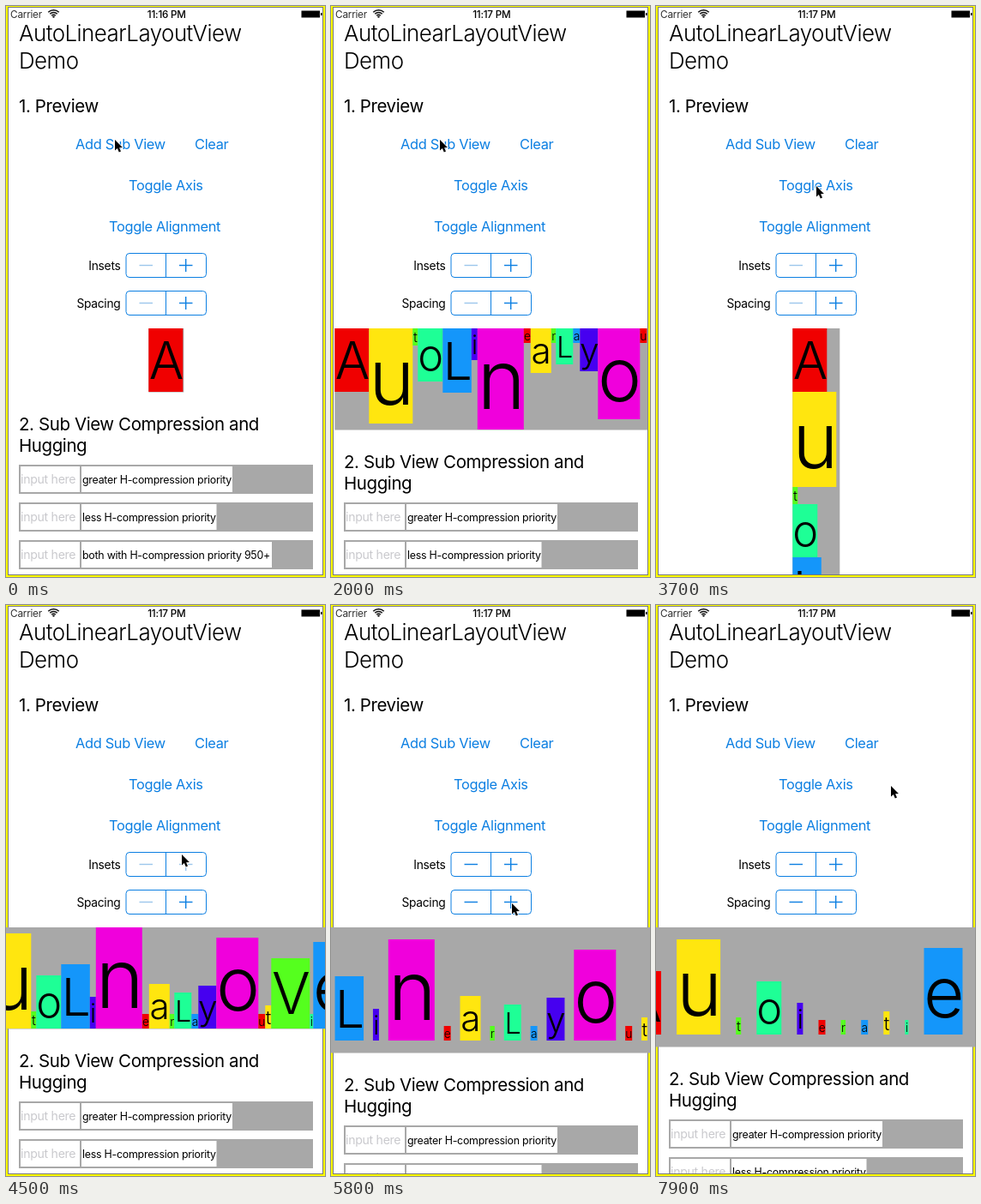
Recreate the animation shown at these times as an HTML page with a canvas. Size 372 px wide and 666 px high, loop 8000 ms.

```html
<!DOCTYPE html>
<html lang="en">
<head>
<meta charset="utf-8">
<title>AutoLinearLayoutView Demo</title>
<style>
html, body { margin: 0; width: 100%; height: 100%; overflow: hidden; background: #fff; }
canvas { display: block; width: 372px; height: 666px; }
</style>
</head>
<body>
<canvas id="stage"></canvas>
<script>
const W = 372, H = 666, LOOP = 8000;
const BLUE = '#0c7fe2', DIM = '#9cc6ec', GRAY = '#a8a8a8';
const TOP = 376, MID = 186.3;
const INSET_STEP = 3.5, GAP_STEP = 3.62;

const canvas = document.getElementById('stage');
const ctx = canvas.getContext('2d');
const ratio = window.devicePixelRatio || 1;
canvas.width = W * ratio;
canvas.height = H * ratio;
ctx.scale(ratio, ratio);

// Sub views: one letter each, with label width and height
const COLORS = ['#f00000', '#ffe60f', '#55ff1e', '#1eff96', '#1496fa', '#4600f0', '#f000dc'];
const WIDTHS = [40, 51, 6, 29, 33.5, 7, 54, 8, 24, 5.5, 20, 8, 21, 49, 8, 7, 45, 4, 45, 31];
const HEIGHTS = [74, 111, 20, 62, 75, 37, 118, 17, 52, 17, 42, 17, 50, 106, 17, 27, 82, 17, 101, 50];
const ITEMS = [...'AutoLinearLayoutView'].map((char, i) => ({
  char, w: WIDTHS[i], h: HEIGHTS[i], color: COLORS[i % COLORS.length]
}));

// Click times
const AXIS = [3400, 3850];
const ALIGN = [4100, 4220];
const INSETS = [4550, 4700, 4850, 5000];
const SPACING = [5350, 5500, 5650, 5920, 6050];
const REMOVE = [6, 10, 12, 8, 13, 14, 16, 4].map((item, i) => ({ item, at: 6300 + i * 160 }));

const passed = (clicks, t) => clicks.filter(c => t >= c).length;
const pressed = (clicks, t) => clicks.some(c => t >= c - 80 && t < c);

function stateAt(t) {
  const gone = REMOVE.filter(r => t >= r.at).map(r => r.item);
  const count = Math.min(ITEMS.length, 1 + Math.floor((t + 100) / 145));
  return {
    items: ITEMS.slice(0, count).filter((_, i) => !gone.includes(i)),
    vertical: passed(AXIS, t) === 1,
    align: passed(ALIGN, t) / 2,
    inset: passed(INSETS, t) * INSET_STEP,
    gap: passed(SPACING, t) * GAP_STEP
  };
}

function layout({ items, vertical, align, inset, gap }) {
  const main = vertical ? 'h' : 'w', cross = vertical ? 'w' : 'h';
  const long = items.reduce((sum, it) => sum + it[main], 0) + gap * (items.length - 1);
  const thick = Math.max(...items.map(it => it[cross]));
  const w = (vertical ? thick : long) + 2 * inset;
  const h = (vertical ? long : thick) + 2 * inset;
  const x = MID - w / 2;
  let pos = inset;
  const boxes = items.map(it => {
    const off = inset + (thick - it[cross]) * align;
    const box = { it, x: x + (vertical ? off : pos), y: TOP + (vertical ? pos : off) };
    pos += it[main] + gap;
    return box;
  });
  return { x, w, h, boxes };
}

// Cursor path: [time, x, y]
const PATH = [
  [0, 127, 156], [2950, 127, 156], [3250, 187, 210], [3900, 187, 210],
  [4050, 187, 258], [4250, 187, 258], [4430, 205, 291], [5080, 205, 291],
  [5280, 211, 348], [6090, 211, 348]
];
for (const { item, at } of REMOVE) {
  const { it, x, y } = layout(stateAt(at - 1)).boxes.find(b => b.it === ITEMS[item]);
  const tipX = Math.max(6, Math.min(W - 8, x + it.w / 2));
  PATH.push([at - 30, tipX, y + it.h / 2], [at + 20, tipX, y + it.h / 2]);
}
PATH.push([7800, 274, 211], [LOOP, 274, 211]);

function cursorAt(t) {
  const i = Math.max(1, PATH.findIndex(p => p[0] >= t));
  const [t0, x0, y0] = PATH[i - 1], [t1, x1, y1] = PATH[i];
  const k = (t - t0) / (t1 - t0), e = k * k * (3 - 2 * k);
  return [x0 + (x1 - x0) * e, y0 + (y1 - y0) * e];
}

function rect(x, y, w, h, color) {
  ctx.fillStyle = color;
  ctx.fillRect(x, y, w, h);
}

function text(str, x, y, size, color = '#000', align = 'left', weight = 400) {
  ctx.font = `${weight} ${size}px Inter, "Open Sans", sans-serif`;
  ctx.letterSpacing = `${-0.02 * size}px`;
  ctx.textAlign = align;
  ctx.fillStyle = color;
  ctx.fillText(str, x, y);
}

function line(x0, y0, x1, y1) {
  ctx.beginPath();
  ctx.moveTo(x0, y0);
  ctx.lineTo(x1, y1);
  ctx.stroke();
}

function drawFrame() {
  rect(0, 0, W, H, '#ffff00');
  rect(2, 1, W - 4, H - 3, '#777');
  rect(3, 2, W - 6, H - 5, '#fff');
}

function drawStatus(t) {
  text('Carrier', 5, 13.5, 11.8, '#333');
  text(t < 1400 ? '11:16 PM' : '11:17 PM', 187.3, 13.5, 11.7, '#000', 'center', 500);
  ctx.strokeStyle = '#111';
  ctx.lineWidth = 1.6;
  for (const r of [3.2, 6, 8.8]) {
    ctx.beginPath();
    ctx.arc(55.5, 13.5, r, -Math.PI * 0.75, -Math.PI * 0.25);
    ctx.stroke();
  }
  ctx.fillStyle = '#111';
  ctx.beginPath();
  ctx.arc(55.5, 12.6, 1.2, 0, 7);
  ctx.fill();
  rect(344.5, 5.5, 21.5, 8, '#000');
  rect(367, 8, 1.5, 3, '#000');
}

function drawStepper(label, y, clicks, t) {
  text(label, 133.5, y + 20, 13.8, '#000', 'right');
  ctx.strokeStyle = BLUE;
  ctx.lineWidth = 1;
  ctx.beginPath();
  ctx.roundRect(140, y + 0.5, 93.5, 28, 4);
  ctx.stroke();
  line(186.5, y + 0.5, 186.5, y + 28.5);
  ctx.lineWidth = 1.4;
  ctx.strokeStyle = passed(clicks, t) ? BLUE : DIM;
  line(155.5, y + 14.5, 171, y + 14.5);
  ctx.strokeStyle = pressed(clicks, t) ? DIM : BLUE;
  line(202, y + 14.5, 217.5, y + 14.5);
  line(209.7, y + 7, 209.7, y + 22);
}

function drawControls(t) {
  text('AutoLinearLayoutView', 15, 41, 25.9, '#000', 'left', 350);
  text('Demo', 15, 73, 25.9, '#000', 'left', 350);
  text('1. Preview', 15, 124, 20.5);
  text('Add Sub View', 81, 167, 16.4, BLUE);
  text('Clear', 220, 167, 16.4, BLUE);
  text('Toggle Axis', 143, 215, 16.4, BLUE);
  text('Toggle Alignment', 120, 263, 16.4, BLUE);
  drawStepper('Insets', 288, INSETS, t);
  drawStepper('Spacing', 332, SPACING, t);
}

function drawPreview({ x, w, h, boxes }) {
  rect(x, TOP, w + 1, h + 0.5, GRAY);
  for (const { it, x, y } of boxes) {
    rect(x, y, it.w, it.h, it.color);
    const size = it.h / 1.193;
    text(it.char, x + it.w / 2, y + size * 0.952, size * 0.97, '#000', 'center', 350);
  }
}

function drawRow(y, label, right) {
  rect(15, y, 343, 34, GRAY);
  rect(17, y + 2, 69, 30, '#fff');
  rect(88, y + 2, right - 88, 30, '#fff');
  text('input here', 17, y + 22, 14.1, '#c9c9cd');
  text(label, 89, y + 21.5, 12.4);
}

function drawSection(y) {
  text('2. Sub View Compression and', 15, y + 45, 20.5);
  text('Hugging', 15, y + 70, 20.5);
  drawRow(y + 85, 'greater H-compression priority', 264);
  drawRow(y + 129, 'less H-compression priority', 245.5);
  drawRow(y + 173, 'both with H-compression priority 950+', 310);
}

const ARROW = [[0, 0], [0, 12.5], [2.9, 10], [4.8, 14.4], [7, 13.4], [5.1, 9.2], [8.9, 9]];
function drawCursor([x, y]) {
  ctx.beginPath();
  ARROW.forEach(([dx, dy]) => ctx.lineTo(x + dx, y + dy));
  ctx.closePath();
  ctx.lineJoin = 'round';
  ctx.lineWidth = 1.6;
  ctx.strokeStyle = '#fff';
  ctx.stroke();
  ctx.fillStyle = '#000';
  ctx.fill();
}

function draw(t) {
  const view = layout(stateAt(t));
  drawFrame();
  drawStatus(t);
  ctx.save();
  ctx.beginPath();
  ctx.rect(0, 0, W, H - 3);
  ctx.clip();
  drawControls(t);
  drawSection(TOP + view.h);
  drawPreview(view);
  ctx.restore();
  drawCursor(cursorAt(t));
}

const start = performance.now();
function tick() {
  draw((performance.now() - start) % LOOP);
  requestAnimationFrame(tick);
}
tick();
</script>
</body>
</html>
```
